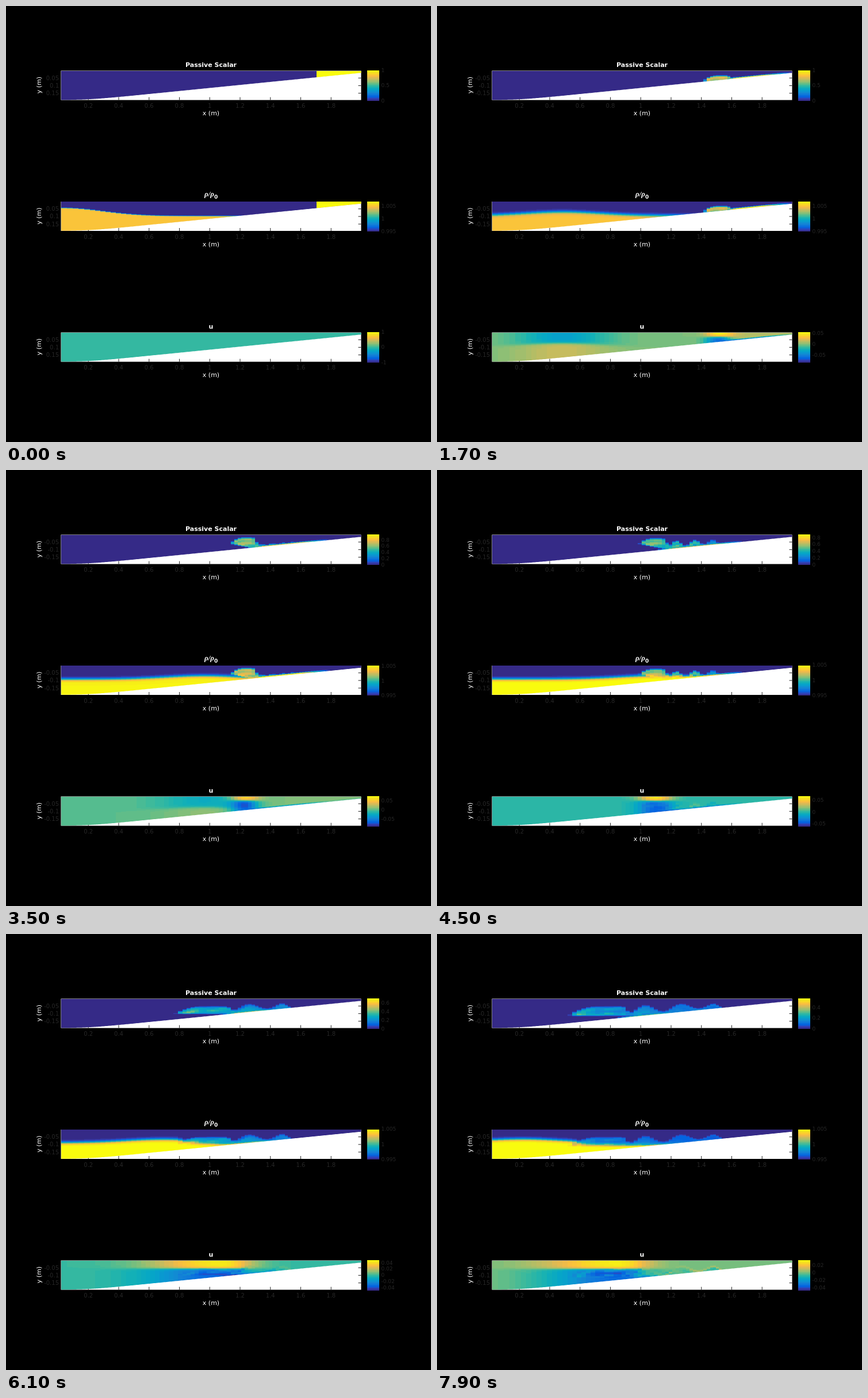
Animation, 739 px wide and 758 px high, one loop 8 s. Source, as an HTML page with a canvas:

```html
<!DOCTYPE html>
<html lang="en">
<head>
<meta charset="utf-8">
<title>Internal wave and gravity current</title>
<style>
html, body { margin: 0; width: 100%; height: 100%; overflow: hidden; background: #000; }
canvas { display: block; }
</style>
</head>
<body>
<canvas id="stage" width="739" height="758"></canvas>
<script>
const ctx = document.getElementById('stage').getContext('2d');
const FRAMES = 80, STEP = 100;
const LEFT = 95.5, TOP = 112.5, W = 522, H = 51, GAP = 227.5;
const SANS = '"DejaVu Sans", sans-serif', DARK = '#262626';

const clamp = v => Math.max(0, Math.min(1, v));
const mix = (a, b, k) => a + (b - a) * k;
const smooth = v => { v = clamp(v); return v * v * (3 - 2 * v); };
const ease = (a, b, v) => smooth((v - a) / (b - a));
const bell = v => Math.exp(-v * v);

function makeCanvas(w, h) {
  const c = document.createElement('canvas');
  c.width = w;
  c.height = h;
  return c;
}

// Colour map with 64 levels
const STOPS = ['352a87', '3243ba', '0363e1', '0d75dc', '1485d4', '0998d1', '06a7c6', '15b1b4', '38b99e',
  '65be86', '92bf73', 'b7bd64', 'd9ba56', 'f8bb44', 'fcce2e', 'f5e41d', 'f9fb0e']
  .map(s => [0, 2, 4].map(i => parseInt(s.slice(i, i + 2), 16)));
const MAP = Array.from({ length: 64 }, (_, i) => {
  const p = i / 63 * 16, n = Math.min(15, Math.floor(p));
  return STOPS[n].map((v, c) => Math.round(mix(v, STOPS[n + 1][c], p - n)));
});
const shade = v => MAP[Math.floor(clamp(v) * 63.99)];

const hash = (x, y) => {
  const v = Math.sin(x * 127.1 + y * 311.7) * 43758.5453;
  return v - Math.floor(v);
};
function noise(x, y) {
  const i = Math.floor(x), j = Math.floor(y), a = smooth(x - i), b = smooth(y - j);
  return mix(mix(hash(i, j), hash(i + 1, j), a), mix(hash(i, j + 1), hash(i + 1, j + 1), a), b);
}

// Depth of the bed, flat at the left end
function bed(x) {
  const d = 3.7 + (617.5 - x) * .0998;
  return d - 2 * Math.log(1 + Math.exp((d - H) / 2));
}

// Flow state: a current runs down the slope, lifts off and spreads as
// an intrusion, while an interface wave runs in and reflects
function stateAt(f) {
  const late = ease(42, 62, f), front = 540 - 4.6 * f + .0085 * f * f, length = 46 + 54 * late;
  return {
    f, late, front, length,
    stir: clamp(f / 10),
    lock: 540 + 3.8 * f,
    crest: 7 - 5 * bell((f - 39) / 7) + 5 * late,
    nose: 14 + 12 * late,
    lobe: .3 + .38 * ease(36, 48, f),
    lobeGap: 18 + 45 * ease(36, 60, f),
    end: mix(618, 500, ease(15, 42, f)),
    floor: mix(60, 16 + 14 * ease(42, 70, f), ease(28, 35, f)),
    head: .78 - .0045 * f,
    waveX: 400 - 7 * Math.abs(f - 43),
    waveA: 6 + 8 * Math.exp(-f / 6),
    base: 25.2 - .03 * f,
    waveU: .034 * ease(0, 10, f) * (1 - ease(28, 46, f)),
    headX: front + .55 * length + 30 * late,
    headW: 23 + 100 * late,
    shear: 7 + 7 * late,
    cMax: 1 - .43 * ease(27.5, 82, f),
    rSpan: .012 - .002 * ease(29, 37, f),
    uMax: f ? .03 + .043 * bell((f - 36) / 27) : 1,
    uMin: f ? -.047 - .052 * bell((f - 27) / 16) : -1
  };
}

// Domed head followed by billows on the slope
function upperEdge(s, x, ground) {
  const d = x - s.front;
  const dome = s.crest + (s.nose - s.crest) * clamp(1 - 2 * d / s.length) ** 2;
  const roll = Math.sin(Math.PI * (d - s.length) / s.lobeGap) ** 2;
  const wake = ground * (1 - s.lobe * (.35 + .65 * roll) * clamp((s.end - x) / 20));
  const top = mix(dome, wake, smooth((d - s.length + 8) / 16));
  return top * clamp(s.f / 14);
}

// Returns a function of depth giving the three fields as 0..1 levels
function column(s, x) {
  const { f, late, stir } = s, ground = bed(x), d = x - s.front;
  const edge = upperEdge(s, x, ground);
  const top = edge + Math.min(0, edge - 2) * 2;
  const low = Math.min(ground + 2, s.floor + .2 * (1 - late) * d);
  const soft = mix(.01, 3.5, stir);
  const inX = clamp((d + 2) / mix(.5, 9, stir));
  const fade = 1 - .45 * clamp(d / 140);
  const full = smooth((x - s.lock) / 8);
  const film = (1.05 - .006 * f) * stir * clamp((d - s.length + 20) / 30) * clamp((668 - 3 * f - x) / 50);

  const wave = s.base - s.waveA * bell((x - s.waveX) / 95) + 3.5 * late * smooth((d - 5) / 20);
  const thick = mix(.7, 3, stir);
  const reach = bell((x - s.headX) / (x > s.headX ? Math.min(s.headW, 55) : s.headW));
  const swell = s.waveU * bell((x - s.waveX) / 80);
  const wake = .012 * smooth((x - s.headX) / 25) * (1 - ease(30, 45, f));

  return y => {
    const body = inX * clamp((y - top) / soft) * clamp((low - y) / 2.5);
    const n = noise(d / 17 + 7, (y - top) / 3.7 + f * .03);
    const settle = mix(1, mix(.7, 1.25, clamp((y - top) / (low - top))), late);
    const skin = clamp((3 - ground + y) / 2);
    const mixed = mix(1, s.head * fade * settle * (.6 + .75 * n), stir);
    const c = clamp(Math.max(body * mixed, body * full, film * skin));

    const deep = .5 + .5 * Math.tanh((y - wave) / thick);
    const rho = (deep * (1 - body * .5) * .01 + c * s.cMax * .012) / s.rSpan;

    const turn = Math.tanh((s.shear - y) / 2.5);
    const u = reach * turn * (turn > 0 ? s.uMax * .9 : -s.uMin * .72)
      + swell * mix(-1, .5, deep) + wake * (1 - skin)
      - film * skin * .05 * (1.2 - f / 80)
      + body * (n - .5) * .022 * ease(36, 45, f);
    return [c, rho, ((f && u) - s.uMin) / (s.uMax - s.uMin)];
  };
}

const layers = [0, 1, 2].map(() => {
  const c = makeCanvas(W, H + 1), g = c.getContext('2d');
  return { c, g, img: g.createImageData(W, H + 1) };
});

// Grid columns get narrower to the right
function paintFields(s) {
  for (let x = 0, w; x < W; x += w) {
    w = Math.min(W - x, Math.round(10 - x * .012));
    const at = column(s, LEFT + x + w / 2);
    for (let y = 0; y <= H; y++) {
      at(y + .5).forEach((v, i) => {
        const rgb = shade(v), px = layers[i].img.data;
        for (let k = 0; k < w; k++) {
          const o = (y * W + x + k) * 4;
          px.set(rgb, o);
          px[o + 3] = 255;
        }
      });
    }
  }
  for (const l of layers) l.g.putImageData(l.img, 0, 0);
}

function text(str, x, y, font, color, align = 'center') {
  ctx.font = font;
  ctx.fillStyle = color;
  ctx.textAlign = align;
  ctx.fillText(str, x, Math.round(y));
}

function drawPanel(i, f) {
  const dy = i * GAP, y0 = TOP + dy;
  const box = (x, y, w, h, color) => { ctx.fillStyle = color; ctx.fillRect(x, y, w, h); };
  box(LEFT, y0, W, H, '#fff');
  for (let k = 1; k < 10; k++) {
    const x = 90.5 + k * 52.75;
    box(x - .5, y0 + H - 5, 1, 5, DARK);
    text(String(+(k * .2).toFixed(1)), x, 177 + dy, '10px ' + SANS, DARK);
  }
  for (let k = 1; k < 4; k++) {
    const y = 112 + k * 13.2 + dy;
    box(LEFT + W - 5, y - .5, 5, 1, DARK);
    text((f ? '-' : '') + +(k * .05).toFixed(2), 92, y + 3.5, '10px ' + SANS, DARK, 'right');
  }

  ctx.save();
  ctx.beginPath();
  ctx.moveTo(LEFT + W, y0);
  ctx.lineTo(LEFT, y0);
  for (let x = LEFT; x <= LEFT + W; x += 2) ctx.lineTo(x, y0 + bed(x));
  ctx.clip();
  ctx.drawImage(layers[i].c, LEFT, y0);
  ctx.restore();

  text('x (m)', 356.5, 190 + dy, '11px ' + SANS, '#fff');
  ctx.save();
  ctx.translate(61, 137.5 + dy);
  ctx.rotate(-Math.PI / 2);
  text('y (m)', 0, 0, '11px ' + SANS, '#fff');
  ctx.restore();
}

const ramp = makeCanvas(1, 64);
MAP.forEach((rgb, k) => {
  const g = ramp.getContext('2d');
  g.fillStyle = `rgb(${rgb})`;
  g.fillRect(0, 63 - k, 1, 1);
});

function drawBar(i, lo, hi, step) {
  const top = 112 + i * GAP, h = 52.5;
  ctx.drawImage(ramp, 627.5, top, 21.5, h);
  for (let k = Math.ceil(lo / step - 1e-6); k * step <= hi + 1e-6; k++) {
    const y = top + h * (1 - (k * step - lo) / (hi - lo));
    text(String(+(k * step).toFixed(3)), 652.5, y + 3, '9px ' + SANS, DARK, 'left');
  }
}

function draw(f) {
  const s = stateAt(f);
  ctx.imageSmoothingEnabled = false;
  ctx.fillStyle = '#000';
  ctx.fillRect(0, 0, 739, 758);
  paintFields(s);
  for (let i = 0; i < 3; i++) drawPanel(i, f);

  text('Passive Scalar', 356.5, 106, 'bold 11px ' + SANS, '#fff');
  text('ρ/ρ', 345, 331, 'italic bold 13px "Liberation Serif", serif', '#fff', 'left');
  text('0', 362, 335, 'bold 9px ' + SANS, '#fff', 'left');
  text('u', 356.5, 561, 'bold 11px ' + SANS, '#fff');

  drawBar(0, 0, s.cMax, s.cMax < 1 ? .2 : .5);
  drawBar(1, .995, .995 + s.rSpan, .005);
  drawBar(2, s.uMin, s.uMax, f ? (s.uMax - s.uMin > .108 ? .05 : .02) : 1);
}

let last = -1;
function tick() {
  const f = Math.floor(performance.now() / STEP) % FRAMES;
  if (f !== last) draw(last = f);
  requestAnimationFrame(tick);
}
tick();
</script>
</body>
</html>
```
